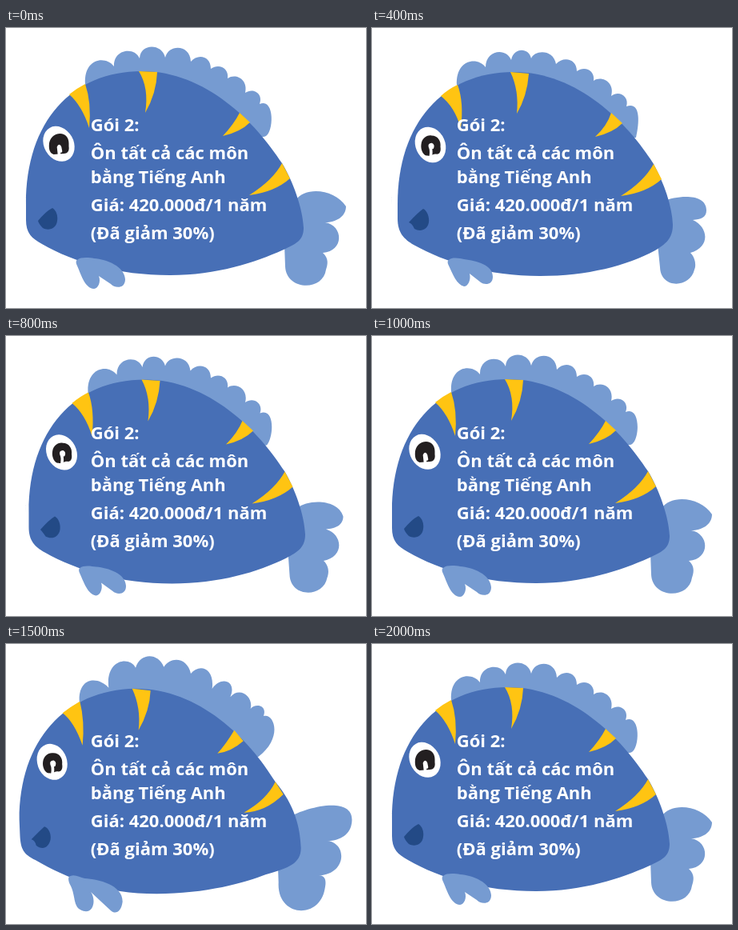
Write an HTML page that moves like this. It is 450 px wide and 350 px high and loops after 2100 ms.

```html
<!DOCTYPE html>
<html lang="vi">
<head>
<meta charset="utf-8">
<title>Gói 2</title>
<style>
  html, body { margin: 0; width: 100%; height: 100%; overflow: hidden; background: #fff; }
  svg { display: block; width: 450px; height: 350px; }
  text { font: 700 22px "Open Sans", "Noto Sans", sans-serif; fill: #fff; }
</style>
</head>
<body>
<svg viewBox="0 0 450 350">
  <g id="fish"></g>
  <g id="eye">
    <g id="pupil"><path fill="#231f20"/><path fill="none" stroke="#fff" stroke-width="3.6" stroke-linecap="round"/></g>
  </g>
  <g>
    <text x="105.8" y="129">Gói 2:</text>
    <text x="105.8" y="164">Ôn tất cả các môn</text>
    <text x="105.8" y="194">bằng Tiếng Anh</text>
    <text x="105.8" y="229">Giá: 420.000đ/1 năm</text>
    <text x="105.8" y="264">(Đã giảm 30%)</text>
  </g>
</svg>
<script>
const STEP = 100, STEPS = 21;
const BLUE = '#476fb6', FIN = '#769bd1', YELLOW = '#ffc412', NAVY = '#234a86';

// Each part: fill, then its outline at rest, swung forward, swung back.
const parts = [
  // back fin
  [FIN,
    'M99,70 C97,38 124,34 135,48 C134,26 161,23 167,38 C168,19 195,19 199,37 C203,20 230,20 231,42 C239,32 256,34 256,51 C266,44 279,50 277,63 C287,56 303,64 299,81 C309,74 322,82 317,95 C337,86 335,136 322,136 L300,140 L120,110 Z',
    'M106,72 C104,40 131,35 142,49 C142,27 168,24 174,40 C177,24 196,24 199,38 C203,27 227,26 230,45 C239,35 256,38 256,54 C266,47 279,53 277,66 C287,59 304,68 299,85 C309,77 322,86 318,98 C335,92 335,115 330,137 L305,140 L125,110 Z',
    'M95,75 C91,40 118,37 131,52 C128,22 157,18 164,33 C168,14 192,14 198,32 C205,17 228,18 231,39 C241,27 259,32 257,54 C268,41 285,48 279,65 C290,54 307,65 303,81 C310,74 325,78 320,92 C336,86 342,125 318,139 L295,140 L115,110 Z'],
  // tail
  [FIN,
    'M362,215 C375,197 412,202 425,223 C425,236 412,243 399,243 C422,247 423,279 396,281 C404,288 402,296 400,302 C396,330 350,328 349,298 L348,270 Z',
    'M365,216 C380,210 418,205 418,228 C418,237 411,239 401,240 C421,249 423,274 398,281 C405,288 405,298 403,302 C398,325 361,327 360,299 L357,270 Z',
    'M357,216 C375,201 429,193 429,225 C427,239 413,246 395,245 C425,243 427,284 393,286 C402,289 401,297 399,305 C393,339 343,336 344,298 L343,270 Z'],
  // body
  [BLUE,
    'M170,54 C82,54 25,117 25,220 L25,240 C25,256 32,263 45,270 C85,293 140,309 205,309 C264,309 311,293 346,277.5 C362,270 372,266 372,250 C371,225 358,190 345,169 C312,118 250,54 170,54 Z',
    'M177,55 C89,55 32,119 32,220 L32,238 C32,256 40,264 52,271 C92,293 145,310 210,310 C269,310 319,297 354,278 C367,270 376,263 376,246 C375,222 365,194 352,170 C319,118 257,55 177,55 Z',
    'M165,55 C77,56 20,119 20,220 L20.5,240 C21,256 26,263 40,270 C80,293 130,311 195,311 C255,311 305,296 333,284 C357,276 370,271 370,253 C369,228 360,197 340,171 C307,118 245,55 165,55 Z'],
  // belly fin
  [FIN,
    'M89,290 C93,286 104,287 110,288 C126,289 148,298 149,314 C149,327 135,325 131,320 L116,310 C119,317 115,326 110,326 C98,325 94,308 88,295 C87,292 88,290 89,290 Z',
    'M96,290 C100,286 110,288 115,289 C131,291 151,296 151,311 C151,322 140,321 136,318 L122,307 C124,315 120,323 115,323 C106,321 101,308 95,295 C94,292 95,290 96,290 Z',
    'M84,290 C89,287 97,290 103,291 C120,292 147,300 147,319 C146,332 136,333 131,328 L110,310 C115,318 112,331 104,331 C88,329 91,313 83,298 C81,293 82,290 84,290 Z'],
  // stripes
  [YELLOW,
    'M79,83 Q95,97 104,125 Q107,93 99,70 Q89,75 79,83 Z',
    'M86,85 Q103,98 111,125 Q115,93 107,71 Q96,76 86,85 Z',
    'M74,85 Q89,97 99,126 Q102,95 95,71 Q84,77 74,85 Z'],
  [YELLOW,
    'M166,54 Q179,75 174,106 Q188,82 189,55 Z',
    'M173,55 Q184,78 181,107 Q194,85 196,57 Z',
    'M161,55 Q173,78 169,107 Q183,83 184,57 Z'],
  [YELLOW,
    'M292,106 Q285,120 271,135 Q293,130 305,118 Z',
    'M299,106 Q294,122 279,136 Q301,131 313,119 Z',
    'M288,107 Q279,123 267,136 Q286,133 300,120 Z'],
  [YELLOW,
    'M345,169 Q334,190 304,209 Q336,205 355,188 Z',
    'M352,170 Q340,192 311,210 Q343,206 362,189 Z',
    'M340,171 Q329,193 300,210 Q329,208 350,188 Z'],
  // mouth
  [NAVY,
    'M40,241 Q50,229 58,225 C63,228 65,235 64,241 C63,251 53,254 46,250 Q41,245 40,241 Z',
    'M46,243 Q57,231 64,226 C69,228 72,237 71,243 C69,253 60,255 53,251 Q50,244 46,243 Z',
    'M35,243 Q45,232 52,227 C57,229 60,236 59,243 C57,254 48,256 41,251 Q38,245 35,243 Z']
];
const eyePose = ['translate(66,144.8) rotate(-30)', 'translate(73,146) rotate(-24)', 'translate(61,146.3) rotate(-24)'];
const pupilPose = ['translate(66.5,145)', 'translate(73.5,146.5)', 'translate(61.5,147)'];

// Pupil and glint, at rest and while moving.
const restPupil = ['M-7,13 C-13,11 -13,4 -12.5,-1 C-11,-9 -5,-13 1,-13 C8,-13 12,-8 12,-1 L12,3 C13,9 10,12 6,12 Z',
  'M0,13 L-1,4 Q0,1 1,4 L2,9'];
const movingPupil = ['M-4,13 C-9,14 -13,6 -12,-1 C-11,-9 -5,-13 1,-12 C9,-12 13,-5 12,2 C13,8 11,12 6,11 C3,11 0,14 -4,13 Z',
  'M0,13 Q1,6 -1,2 Q-2,-1 1,-1 Q3,0 2,3'];

const make = (tag, parent, attrs) => {
  const el = document.createElementNS('http://www.w3.org/2000/svg', tag);
  for (const key in attrs) el.setAttribute(key, attrs[key]);
  return parent.appendChild(el);
};
const byId = id => document.getElementById(id);
const NUM = /-?\d+(\.\d+)?/g;

const shapes = parts.map(([fill]) => make('path', byId('fish'), { fill }));
const white = make('ellipse', byId('eye'), { rx: 18.5, ry: 23, fill: '#fff' });
const pupil = byId('pupil');
byId('eye').insertBefore(white, pupil);

// Forward poses sit 4 steps from rest, back poses 3 steps.
function blend([rest, forward, back], swing) {
  const goal = (swing > 0 ? forward : back).match(NUM);
  const k = swing > 0 ? swing / 4 : -swing / 3;
  let i = 0;
  return rest.replace(NUM, n => (+n + (goal[i++] - n) * k).toFixed(2));
}

function draw(step) {
  const swing = step <= 5 ? step : step <= 15 ? 10 - step : step - 20;
  parts.forEach((part, i) => shapes[i].setAttribute('d', blend(part.slice(1), swing)));
  white.setAttribute('transform', blend(eyePose, swing));
  pupil.setAttribute('transform', blend(pupilPose, swing));
  (swing ? movingPupil : restPupil).forEach((d, i) => pupil.children[i].setAttribute('d', d));
}

const start = performance.now();
let shown = -1;
function tick() {
  const step = Math.floor((performance.now() - start) / STEP) % STEPS;
  if (step !== shown) draw(shown = step);
  requestAnimationFrame(tick);
}
tick();
</script>
</body>
</html>
```
